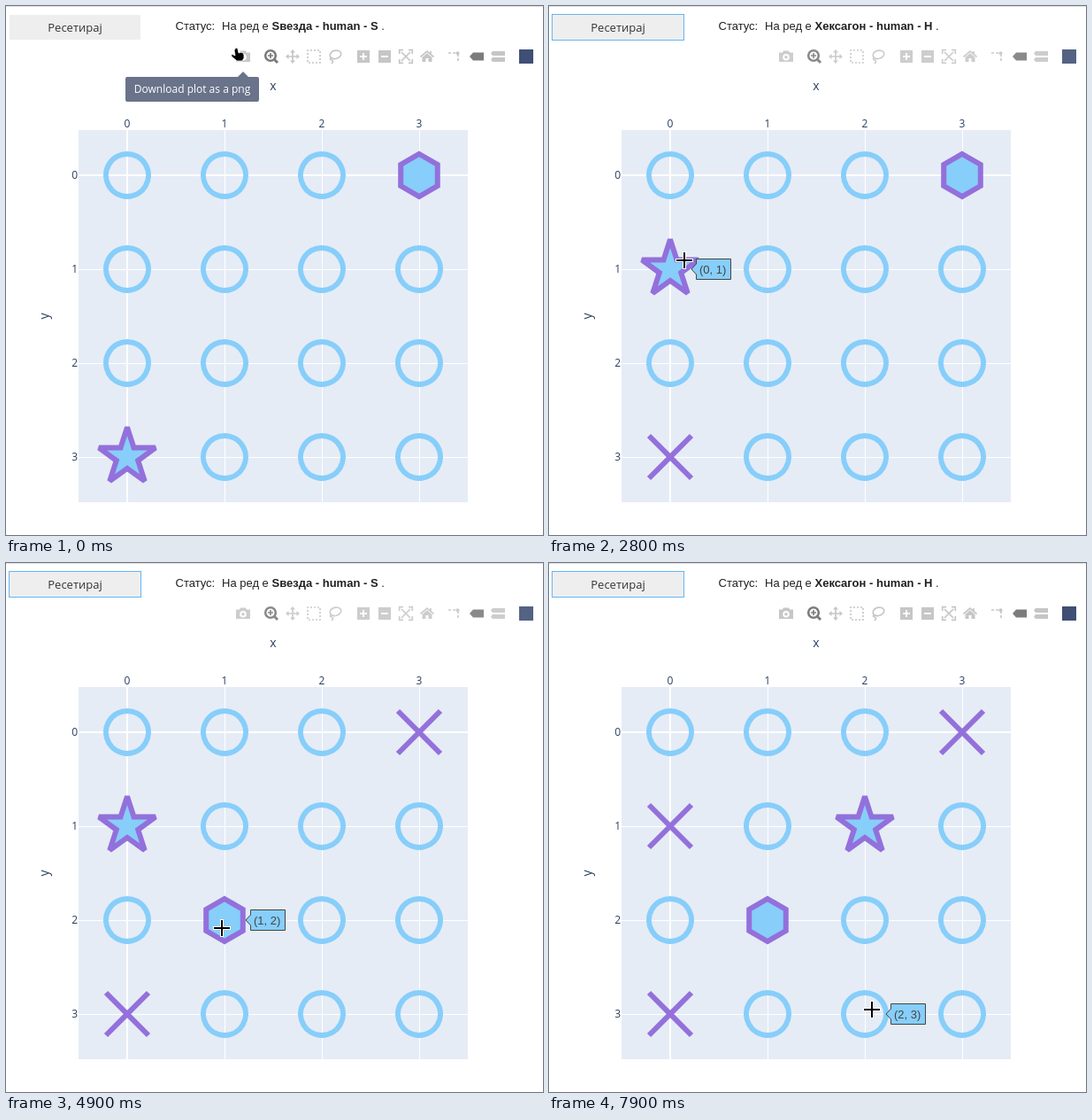
Write an HTML page that moves like this. It is 607x597 px and loops after 8 s.

```html
<!DOCTYPE html>
<html lang="mk">
<head>
<meta charset="utf-8">
<title>Board game</title>
<style>
  html, body { margin: 0; width: 100%; height: 100%; overflow: hidden; background: #fff; }
  svg { display: block; }
  .ui { font: 13px "Open Sans", "Noto Sans", sans-serif; }
  .status { font: 13px "Liberation Sans", Arial, sans-serif; white-space: pre; }
  .axis { font: 12px "Open Sans", sans-serif; }
  .title { font-size: 14px; }
  .piece { stroke-width: 6; stroke-miterlimit: 2; fill: #87cefa; stroke: #9370db; }
  .free { fill: none; stroke: #87cefa; }
  .spent { fill: none; }
  .icon { fill: #444; opacity: .3; }
  .active { opacity: .7; }
  .line { fill: none; stroke: #444; stroke-width: 1.7; }
  .cut { fill: none; stroke: #fff; stroke-width: 2; }
</style>
</head>
<body>
<svg id="stage" width="607" height="597" viewBox="0 0 607 597">
  <path d="M0 .5H607" stroke="#ddd"/>
  <rect x="4" y="10" width="148" height="28" fill="#eee"/>
  <rect id="focus" x="3.5" y="9.5" width="149" height="29" fill="none" stroke="#64b5f6"/>
  <text class="ui" x="78" y="29" text-anchor="middle" fill="#333">Ресетирај</text>
  <g class="status" fill="#212121">
    <text x="191.5" y="27">Статус:</text>
    <text x="244" y="27">На ред е</text>
    <text x="300.5" y="27"><tspan id="player" font-weight="bold"></tspan> .</text>
  </g>

  <rect x="82" y="140" width="440" height="420" fill="#e5ecf6"/>
  <g id="grid" stroke="#fff"></g>
  <g id="ticks" class="axis" fill="#2a3f5f">
    <text class="title" x="302" y="95" text-anchor="middle">x</text>
    <text class="title" transform="translate(48 350) rotate(-90)" text-anchor="middle">y</text>
  </g>
  <g id="board"></g>

  <g id="modebar">
    <g class="icon" transform="translate(268 57)">
      <path d="M-8-4.5H-4L-3-6.5H3L4-4.5H8V6H-8Z"/>
      <circle class="cut" cy=".7" r="2.8"/>
    </g>
    <g class="icon active" transform="translate(300 57)">
      <circle class="line" cx="-1" cy="-1" r="5.8" style="stroke-width:2.6"/>
      <path class="line" d="M3 3L7 7" style="stroke-width:3"/>
      <path class="line" d="M-4-1H2M-1-4V2"/>
    </g>
    <g class="icon" transform="translate(324 57)">
      <path class="line" d="M-6 0H6M0-6V6"/>
      <path id="tip" d="M0-8L3-4.5H-3Z"/>
      <use href="#tip" transform="rotate(90)"/>
      <use href="#tip" transform="rotate(180)"/>
      <use href="#tip" transform="rotate(270)"/>
    </g>
    <g class="icon" transform="translate(348 57)">
      <rect class="line" x="-7" y="-7" width="14" height="14" stroke-dasharray="2" stroke-dashoffset="1"/>
    </g>
    <g class="icon" transform="translate(372 57)">
      <ellipse class="line" cx="1" cy="-2" rx="6.4" ry="4.6" transform="rotate(-15)"/>
      <path class="line" d="M-4 1Q-7 3-4 4T-4 8"/>
    </g>
    <g class="icon" transform="translate(404 57)">
      <rect x="-7" y="-7" width="14" height="14"/>
      <path class="cut" d="M-4 0H4M0-4V4"/>
    </g>
    <g class="icon" transform="translate(428 57)">
      <rect x="-7" y="-7" width="14" height="14"/>
      <path class="cut" d="M-4 0H4"/>
    </g>
    <g class="icon" transform="translate(452 57)">
      <rect class="line" x="-7.3" y="-7.3" width="14.6" height="14.6" stroke-dasharray="8.6 6" stroke-dashoffset="4.3"/>
      <path class="line" d="M-5-5L5 5M5-5L-5 5"/>
    </g>
    <g class="icon" transform="translate(476 57)">
      <path class="line" d="M-7.5 .5L0-6L7.5 .5M4-6V-3"/>
      <path d="M-5.5 1L0-3.7L5.5 1V6H1.5V2H-1.5V6H-5.5Z"/>
    </g>
    <g class="icon" transform="translate(506 57)">
      <path class="line" d="M-6-4H4M5-3V7" stroke-dasharray="3 2"/>
      <circle cx="4.5" cy="-3.8" r="2"/>
    </g>
    <path class="icon active" transform="translate(532 57)" d="M-8 0L-4-4.5H8V4.5H-4Z"/>
    <g class="icon" transform="translate(556 57)">
      <path id="bar" d="M-8-3.5L-6-6H8V-1H-6Z"/>
      <use href="#bar" y="7"/>
    </g>
    <rect x="580" y="49" width="16" height="16" fill="#3f4f75"/>
  </g>

  <g id="tooltip">
    <rect x="135" y="80" width="151" height="28" rx="2" fill="#69738a"/>
    <path d="M268 74L274 80H262Z" fill="#69738a"/>
    <text class="axis" x="210.5" y="98" text-anchor="middle" fill="#fff">Download plot as a png</text>
  </g>

  <g id="label">
    <path d="M0 0L5.5 6V11.5H44.5V-11.5H5.5V-6Z" fill="#87cefa" stroke="#444"/>
    <text id="coords" class="status" x="9" y="5" fill="#444"></text>
  </g>

  <g id="cross" stroke-linecap="square">
    <path d="M-8 0H8M0-8V8" stroke="#fff" stroke-width="4"/>
    <path d="M-8 0H8M0-8V8" stroke="#000" stroke-width="2"/>
  </g>
  <path id="arrow" d="M0 0V15.5L3.6 12.2L6 17.5L8.6 16.3L6.3 11.2H11Z" stroke="#fff" stroke-width=".8"/>
  <path id="hand" d="M0 0Q2-1.5 3 .5L4 5Q9 3 10 7V11L8 14H2L-4 9Q-5 7-3 6.5L0 8L-1 2Z" stroke="#fff" stroke-width=".8"/>
</svg>
<script>
const LOOP = 8000, STEP = 100, FADE_STEPS = 3, SIZE = 24;
const byId = id => document.getElementById(id);
const cells = [0, 1, 2, 3];
const cellX = col => 137 + 110 * col;
const cellY = row => 191 + 106 * row;

const radial = (n, radius) => 'M' + Array.from({ length: n }, (_, k) => {
  const a = k * 2 * Math.PI / n;
  return [radius(k) * Math.sin(a), -radius(k) * Math.cos(a)].map(v => v.toFixed(2));
}).join('L') + 'Z';

const STAR = 1.4 * SIZE;
const SHAPES = {
  free: `M0-${SIZE}A${SIZE} ${SIZE} 0 1 1-.01-${SIZE}Z`,
  spent: `M-${SIZE}-${SIZE}L${SIZE} ${SIZE}M${SIZE}-${SIZE}L-${SIZE} ${SIZE}`,
  hexagon: radial(6, () => SIZE),
  star: radial(10, k => k % 2 ? STAR * .382 : STAR)
};

const PLAYERS = { star: 'Ѕвезда - human - Ѕ', hexagon: 'Хексагон - human - Н' };
const START = { '0 3': 'star', '3 0': 'hexagon' };
const MOVES = [
  { at: 2600, piece: 'star', to: '0 1' },
  { at: 4700, piece: 'hexagon', to: '1 2' },
  { at: 7400, piece: 'star', to: '2 1' }
];

// The pointer glides between these places and rests at some of them.
const STOPS = [
  { at: 0, rest: 200, x: 259, y: 48 },
  { at: 700, rest: 200, x: 262, y: 38 },
  { at: 1200, x: 189, y: 338 },
  { at: 2100, rest: 600, x: 147, y: 296 },
  { at: 3500, x: 298, y: 77 },
  { at: 3900, x: 288, y: 40 },
  { at: 4500, rest: 800, x: 244, y: 412 },
  { at: 5900, x: 285, y: 33 },
  { at: 6300, x: 262, y: 48 },
  { at: 7000, x: 327, y: 302 },
  { at: 7300, rest: 200, x: 350, y: 300 },
  { at: 7900, x: 365, y: 504 }
];

const ease = u => u * u * (3 - 2 * u);

function pointerAt(t) {
  const i = STOPS.findLastIndex(s => s.at <= t);
  const a = STOPS[i], b = STOPS[i + 1] || a;
  const leave = a.at + (a.rest || 0);
  const u = t > leave && b !== a ? ease((t - leave) / (b.at - leave)) : 0;
  return { x: a.x + (b.x - a.x) * u, y: a.y + (b.y - a.y) * u };
}

// The toolbar fades out when the pointer is above the chart, and blinks on a redraw.
function modebarOpacity(t) {
  let awake = 0;
  for (let k = 0; k < FADE_STEPS; k++) {
    const past = Math.max(0, t - k * STEP);
    if (pointerAt(past).y >= 46 && !MOVES.some(m => m.at === past)) awake++;
  }
  const u = awake / FADE_STEPS;
  return u * (2 - u);
}

function show(id, visible) {
  byId(id).style.display = visible ? '' : 'none';
}

function place(id, x, y) {
  byId(id).setAttribute('transform', `translate(${x} ${y})`);
}

function drawAxes() {
  for (const i of cells) {
    const x = cellX(i), y = cellY(i), width = i ? 1 : 2, shift = i ? .5 : 0;
    byId('grid').innerHTML +=
      `<path d="M${x + shift} 140V560M82 ${y + shift}H522" stroke-width="${width}"/>`;
    byId('ticks').innerHTML +=
      `<text x="${x}" y="137" text-anchor="middle">${i}</text>` +
      `<text x="81" y="${y + 4}" text-anchor="end">${i}</text>`;
  }
}

function drawBoard(moveCount) {
  const board = { ...START };
  for (const { piece, to } of MOVES.slice(0, moveCount)) {
    const from = Object.keys(board).find(cell => board[cell] === piece);
    board[from] = 'spent';
    board[to] = piece;
  }
  byId('player').textContent = PLAYERS[moveCount % 2 ? 'hexagon' : 'star'];
  byId('board').innerHTML = cells.flatMap(row => cells.map(col => {
    const kind = board[`${col} ${row}`] || 'free';
    return `<path class="piece ${kind}" d="${SHAPES[kind]}" transform="translate(${cellX(col)} ${cellY(row)})"/>`;
  })).join('');
}

function drawPointer({ x, y }) {
  const onIcons = x >= 256 && y >= 46 && y <= 68;
  const onPlot = x > 82 && x < 522 && y > 140 && y < 560;
  const kind = onPlot ? 'cross' : onIcons ? 'hand' : 'arrow';
  for (const id of ['cross', 'hand', 'arrow']) show(id, id === kind);
  place(kind, Math.round(x), Math.round(y));
  show('tooltip', onIcons && x <= 280);

  const col = Math.round((x - cellX(0)) / 110), row = Math.round((y - cellY(0)) / 106);
  show('label', onPlot && Math.hypot(x - cellX(col), y - cellY(row)) < SIZE);
  place('label', cellX(col) + SIZE, cellY(row));
  byId('coords').textContent = `(${col}, ${row})`;
}

let drawnMoves;
function render(now) {
  const t = Math.floor(now % LOOP / STEP) * STEP;
  const moveCount = MOVES.filter(m => m.at <= t).length;
  if (moveCount !== drawnMoves) drawBoard(drawnMoves = moveCount);
  show('focus', t >= 2300);
  byId('modebar').style.opacity = modebarOpacity(t);
  drawPointer(pointerAt(t));
}

drawAxes();
const start = performance.now();
function tick() {
  render(performance.now() - start);
  requestAnimationFrame(tick);
}
tick();
</script>
</body>
</html>
```
